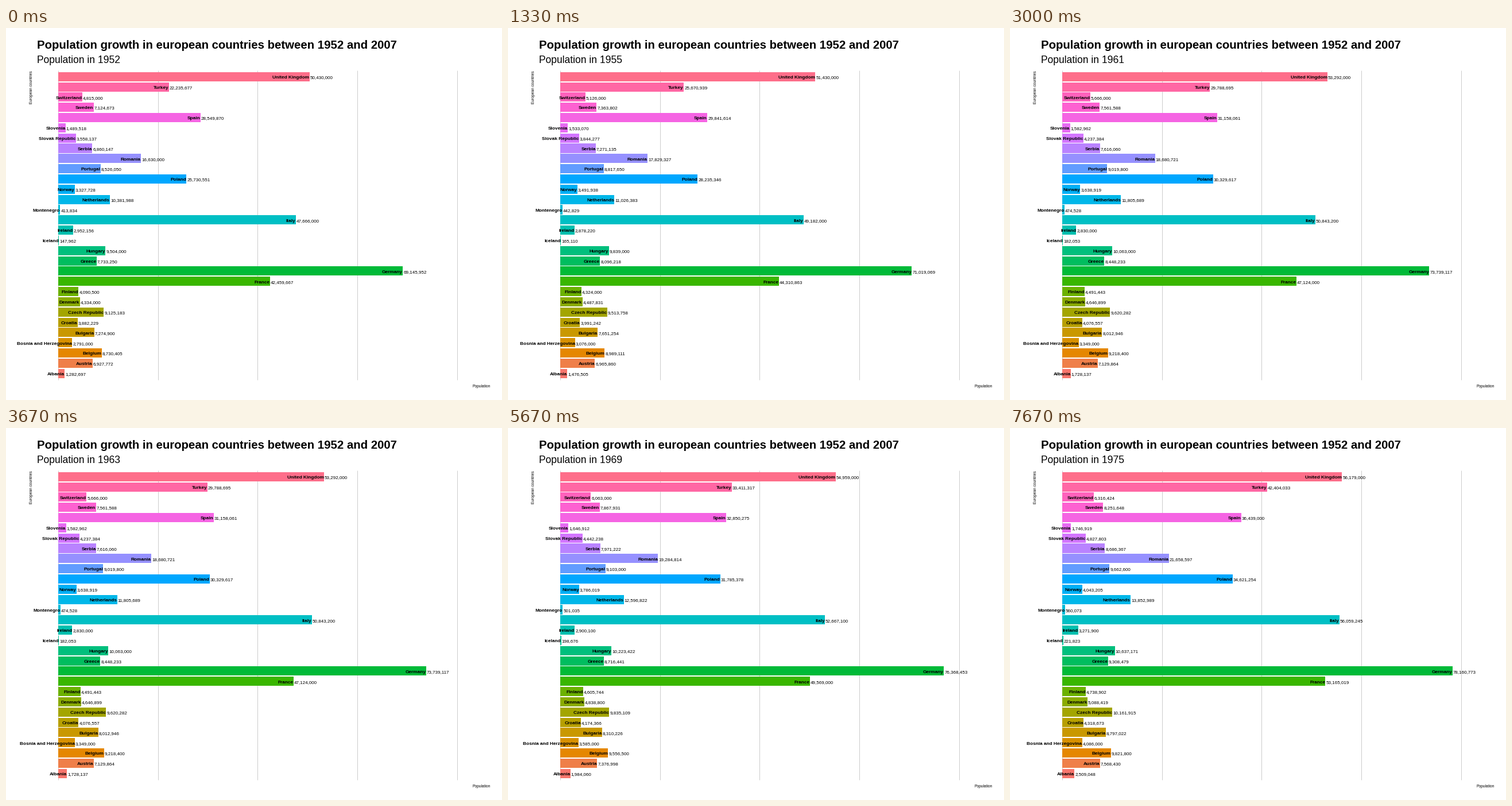
A matplotlib script for the animation above (8 s loop, 864x648 px).

```python
import numpy as np
import matplotlib.pyplot as plt
from matplotlib.animation import FuncAnimation

plt.rcParams["font.family"] = "Liberation Sans"

WIDTH, HEIGHT, DPI = 864, 648, 72
FRAMES, LOOP_MS = 24, 8000
FIRST_YEAR, SURVEY_STEP = 1952, 5
ZERO_X, PX_PER_PERSON = 90.9, 173.65 / 20e6
PANEL_TOP, PANEL_BOTTOM = 74, 612.5
TOP_ROW_Y, ROW_STEP = 84.7, 17.83
BAR_HEIGHT = 0.9 * ROW_STEP

names, populations = [], []


def country(name, *survey):
    """Register a country with its population every five years from 1952."""
    names.append(name)
    populations.append(survey)


country("Albania", 1282697, 1476505, 1728137, 1984060, 2263554, 2509048)
country("Austria", 6927772, 6965860, 7129864, 7376998, 7544201, 7568430)
country("Belgium", 8730405, 8989111, 9218400, 9556500, 9709100, 9821800)
country("Bosnia and Herzegovina", 2791000, 3076000, 3349000, 3585000, 3819000, 4086000)
country("Bulgaria", 7274900, 7651254, 8012946, 8310226, 8576200, 8797022)
country("Croatia", 3882229, 3991242, 4076557, 4174366, 4225310, 4318673)
country("Czech Republic", 9125183, 9513758, 9620282, 9835109, 9862158, 10161915)
country("Denmark", 4334000, 4487831, 4646899, 4838800, 4991596, 5088419)
country("Finland", 4090500, 4324000, 4491443, 4605744, 4639657, 4738902)
country("France", 42459667, 44310863, 47124000, 49569000, 51732000, 53165019)
country("Germany", 69145952, 71019069, 73739117, 76368453, 78717088, 78160773)
country("Greece", 7733250, 8096218, 8448233, 8716441, 8888628, 9308479)
country("Hungary", 9504000, 9839000, 10063000, 10223422, 10394091, 10637171)
country("Iceland", 147962, 165110, 182053, 198676, 209275, 221823)
country("Ireland", 2952156, 2878220, 2830000, 2900100, 3024400, 3271900)
country("Italy", 47666000, 49182000, 50843200, 52667100, 54365564, 56059245)
country("Montenegro", 413834, 442829, 474528, 501035, 527678, 560073)
country("Netherlands", 10381988, 11026383, 11805689, 12596822, 13329874, 13852989)
country("Norway", 3327728, 3491938, 3638919, 3786019, 3933004, 4043205)
country("Poland", 25730551, 28235346, 30329617, 31785378, 33039545, 34621254)
country("Portugal", 8526050, 8817650, 9019800, 9103000, 8970450, 9662600)
country("Romania", 16630000, 17829327, 18680721, 19284814, 20662648, 21658597)
country("Serbia", 6860147, 7271135, 7616060, 7971222, 8313288, 8686367)
country("Slovak Republic", 3558137, 3844277, 4237384, 4442238, 4593433, 4827803)
country("Slovenia", 1489518, 1533070, 1582962, 1646912, 1694510, 1746919)
country("Spain", 28549870, 29841614, 31158061, 32850275, 34513161, 36439000)
country("Sweden", 7124673, 7363802, 7561588, 7867931, 8122293, 8251648)
country("Switzerland", 4815000, 5126000, 5666000, 6063000, 6401400, 6316424)
country("Turkey", 22235677, 25670939, 29788695, 33411317, 37492953, 42404033)
country("United Kingdom", 50430000, 51430000, 53292000, 54959000, 56079000, 56179000)

populations = np.array(populations)


def hcl_color(hue, chroma=100, lum=65):
    """Convert polar CIE-LUV to clipped sRGB."""
    angle = np.radians(hue)
    u = chroma * np.cos(angle) / (13 * lum) + 0.1978398
    v = chroma * np.sin(angle) / (13 * lum) + 0.4683363
    y = ((lum + 16) / 116) ** 3
    x = 9 * y * u / (4 * v)
    z = -x / 3 - 5 * y + 3 * y / v
    to_rgb = [[3.240479, -1.537150, -0.498535],
              [-0.969256, 1.875992, 0.041556],
              [0.055648, -0.204043, 1.057311]]
    linear = np.clip(np.dot(to_rgb, [x, y, z]), 0, 1)
    return np.where(linear > 0.00304, 1.055 * linear ** (1 / 2.4) - 0.055, 12.92 * linear)


def cubic_in_out(t):
    return 4 * t ** 3 if t < 0.5 else 1 - 4 * (1 - t) ** 3


fig = plt.figure(figsize=(WIDTH / DPI, HEIGHT / DPI), dpi=DPI, facecolor="white")
ax = fig.add_axes([0, 0, 1, 1])
ax.set(xlim=(0, WIDTH), ylim=(HEIGHT, 0))
ax.axis("off")


def label(x, y, text, size, **style):
    style = {"va": "baseline", "color": "black", "zorder": 3, **style}
    return ax.text(x, y, text, fontsize=size, **style)


for people in np.arange(5) * 20e6:
    x = ZERO_X + people * PX_PER_PERSON
    ax.plot([x, x], [PANEL_TOP, PANEL_BOTTOM], color="#cccccc", lw=1,
            solid_capstyle="butt", zorder=1)

label(54, 36, "Population growth in european countries between 1952 and 2007",
      20.4, weight="bold")
subtitle = label(54, 61, "", 17.5)
label(843.5, 626, "Population", 6.6, ha="right")
label(44, PANEL_TOP, "European countries", 6.6, rotation=90, ha="center", va="top")

rows = []
for i, name in enumerate(names):
    y = TOP_ROW_Y + (len(names) - 1 - i) * ROW_STEP
    bar = ax.barh(y, 0, BAR_HEIGHT, left=ZERO_X, lw=0, zorder=2,
                  color=hcl_color(15 + i * 360 / len(names)))[0]
    name_text = label(0, y + 3.3, name, 8.2, ha="right", weight="bold")
    value_text = label(0, y + 3.3, "", 7.95, ha="left")
    rows.append((bar, name_text, value_text))
ax.set(xlim=(0, WIDTH), ylim=(HEIGHT, 0))


def update(frame):
    subtitle.set_text(f"Population in {FIRST_YEAR + frame}")
    survey, years = divmod(frame, SURVEY_STEP)
    t = years / SURVEY_STEP
    before, after = populations[:, survey], populations[:, survey + 1]
    lengths = (before + (after - before) * cubic_in_out(t)) * PX_PER_PERSON
    shown = before if t < 0.5 else after
    for (bar, name_text, value_text), length, value in zip(rows, lengths, shown):
        end = ZERO_X + length
        bar.set_width(length)
        name_text.set_x(end - 0.3)
        value_text.set_x(end + 1)
        value_text.set_text(f"{value:,}")
    return []


anim = FuncAnimation(fig, update, frames=FRAMES, interval=LOOP_MS / FRAMES,
                     init_func=lambda: update(0), repeat=True, repeat_delay=0)
plt.show()
```
